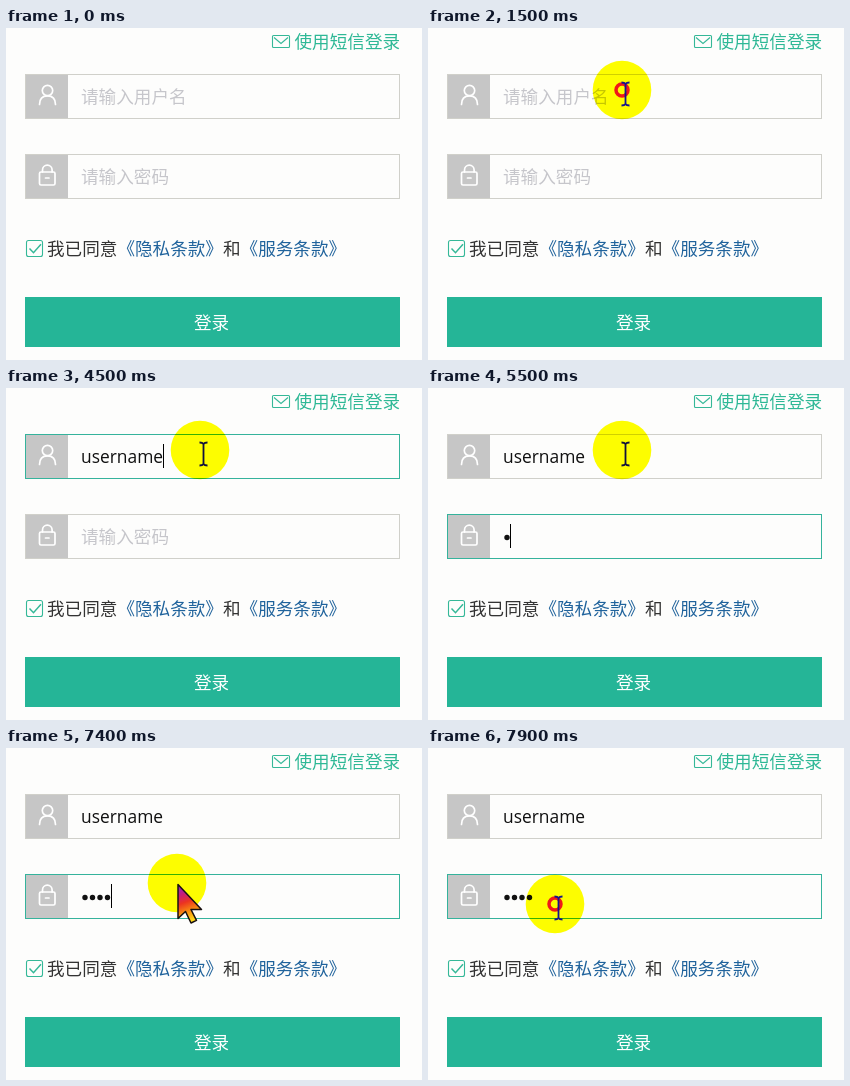
Animation of 416 by 332 pixels, one loop 8 s. Source, as an HTML page:

```html
<!DOCTYPE html>
<html lang="zh-CN">
<head>
<meta charset="utf-8">
<title>登录</title>
<style>
  html, body { margin: 0; width: 100%; height: 100%; overflow: hidden; background: #fdfdfc; }
  svg { display: block; width: 416px; height: 332px; background: #fdfdfc; }
  text { font: 17.6px "Noto Sans CJK SC", "Noto Sans CJK", "Noto Sans", sans-serif; white-space: pre; }
  .latin { font: 17.4px "Open Sans", "Noto Sans", sans-serif; fill: #111; }
  .hint { fill: #c6c6cb; }
  .link { fill: #20639c; }
  .edge { fill: none; stroke: #d0d0ca; }
  .edge.on { stroke: #35b39c; }
  .tile { fill: #c6c6c6; }
  .icon { fill: none; stroke: #fff; stroke-width: 1.7; stroke-linecap: round; }
  .green { fill: none; stroke: #35b898; stroke-width: 1.1; }
  #glow { mix-blend-mode: multiply; }
</style>
</head>
<body>
<svg viewBox="0 0 416 332">
  <defs>
    <linearGradient id="rainbow" gradientUnits="userSpaceOnUse" x1="2" y1="3" x2="15" y2="37">
      <stop offset="0" stop-color="#8a28c8"/>
      <stop offset=".25" stop-color="#c81c78"/>
      <stop offset=".48" stop-color="#ec3420"/>
      <stop offset=".75" stop-color="#f89010"/>
      <stop offset="1" stop-color="#ffd818"/>
    </linearGradient>
  </defs>

  <g class="green">
    <rect x="266.5" y="7.5" width="17" height="12" rx="1"/>
    <path d="M268 9.5l7 6 7-6"/>
  </g>
  <text x="288.5" y="20" fill="#2eb896">使用短信登录</text>

  <rect class="tile" x="19" y="46" width="43" height="45"/>
  <g class="icon">
    <circle cx="41.5" cy="62.5" r="5.2"/>
    <path d="M33.5 76.5c0-5.5 3-8.700 8-8.700s8 3.200 8 8.700"/>
  </g>
  <rect class="edge" id="userEdge" x="19.5" y="46.5" width="374" height="44"/>
  <text class="hint" id="userHint" x="75" y="74.7">请输入用户名</text>
  <text class="latin" id="user" x="75" y="75"></text>

  <rect class="tile" x="19" y="126" width="43" height="45"/>
  <g class="icon">
    <rect x="33.5" y="144" width="15.5" height="13" rx="1.5"/>
    <path d="M36.5 144v-2a4.800 4.800 0 0 1 9.600 0v2M39.5 150h3.500"/>
  </g>
  <rect class="edge" id="passEdge" x="19.5" y="126.5" width="374" height="44"/>
  <text class="hint" id="passHint" x="75" y="154.7">请输入密码</text>
  <g id="dots" fill="#111">
    <circle cx="79" cy="149.5" r="2.7"/>
    <circle cx="86.5" cy="149.5" r="2.7"/>
    <circle cx="94" cy="149.5" r="2.7"/>
    <circle cx="101.5" cy="149.5" r="2.7"/>
  </g>
  <rect id="caret" width="1" height="24" fill="#000"/>

  <rect class="green" x="20.5" y="212.5" width="16" height="16" rx="2"/>
  <path class="green" d="M23.5 220.5l4 4.200 7.500-8.500" style="stroke-width:1.5"/>
  <text x="41" y="227" fill="#333">我已同意<tspan class="link">《隐私条款》</tspan>和<tspan class="link">《服务条款》</tspan></text>

  <rect x="19" y="269" width="375" height="50" fill="#25b597"/>
  <text x="188" y="301" fill="#fff">登录</text>

  <circle id="glow" r="29.3" fill="#ff0"/>
  <g id="pointer">
    <circle id="ring" r="6" fill="none" stroke="#f01818" stroke-width="3.5"/>
    <path id="beam" d="M-.5-7.500q3 0 4 1.500 1-1.500 4-1.500M3.500-6V14M-.5 15.500q3 0 4-1.500 1 1.500 4 1.500" fill="none" stroke-width="1.800"/>
    <path id="arrow" d="M1 1.500V35.500L8.500 28.500 14 40 19.500 37.300 14 26.500H24.500Z" fill="url(#rainbow)" stroke="#181010" stroke-width="1.500" stroke-linejoin="round"/>
  </g>
</svg>
<script>
const $ = id => document.getElementById(id);
const show = (el, on) => el.style.display = on ? "" : "none";
const within = (t, a, b) => t >= a && t < b;

// Start time and value; each value holds until the next one.
const typing = [[0, ""], [3000, "u"], [3400, "use"], [3700, "user"], [4200, "usern"],
  [4300, "userna"], [4400, "usernam"], [4500, "username"]];
const path = [[900, 246, 103], [1000, 236, 98], [1100, 222, 88], [1200, 208, 74],
  [1300, 199, 66], [1400, 194, 62], [7300, 190, 80], [7400, 171, 135],
  [7500, 155, 178], [7600, 143, 184], [7700, 133, 170], [7800, 127, 156]];
const dotTimes = [5500, 5800, 6000, 6300];
const last = (list, t) => list.filter(k => k[0] <= t).pop();

function draw(t) {
  const name = last(typing, t)[1];
  const count = dotTimes.filter(d => d <= t).length;
  const onUser = within(t, 1600, 5000), onPass = t >= 5000;

  $("user").textContent = name;
  show($("userHint"), !name);
  show($("passHint"), !count);
  [...$("dots").children].forEach((dot, i) => show(dot, i < count));
  $("userEdge").classList.toggle("on", onUser);
  $("passEdge").classList.toggle("on", onPass);

  const blank = within(t, 2200, 2700) || within(t, 6800, 7300) || t >= 7800;
  show($("caret"), (onUser || onPass) && !blank);
  const width = onPass ? 7.5 * count : name ? $("user").getComputedTextLength() : 0;
  $("caret").setAttribute("x", Math.floor(75 + width));
  $("caret").setAttribute("y", onPass ? 136 : 56);

  const pos = last(path, t);
  show($("glow"), pos);
  show($("pointer"), pos);
  if (!pos) return;
  const move = `translate(${pos[1]} ${pos[2]})`;
  $("glow").setAttribute("transform", move);
  $("pointer").setAttribute("transform", move);
  const arrow = within(t, 900, 1100) || within(t, 7400, 7700);
  const click = within(t, 1500, 1700) || t >= 7900;
  show($("arrow"), arrow);
  show($("beam"), !arrow);
  show($("ring"), click);
  $("beam").setAttribute("stroke", click ? "#14148c" : "#10103c");
}

const start = performance.now();
function tick() {
  draw((performance.now() - start) % 8000);
  requestAnimationFrame(tick);
}
tick();
</script>
</body>
</html>
```
